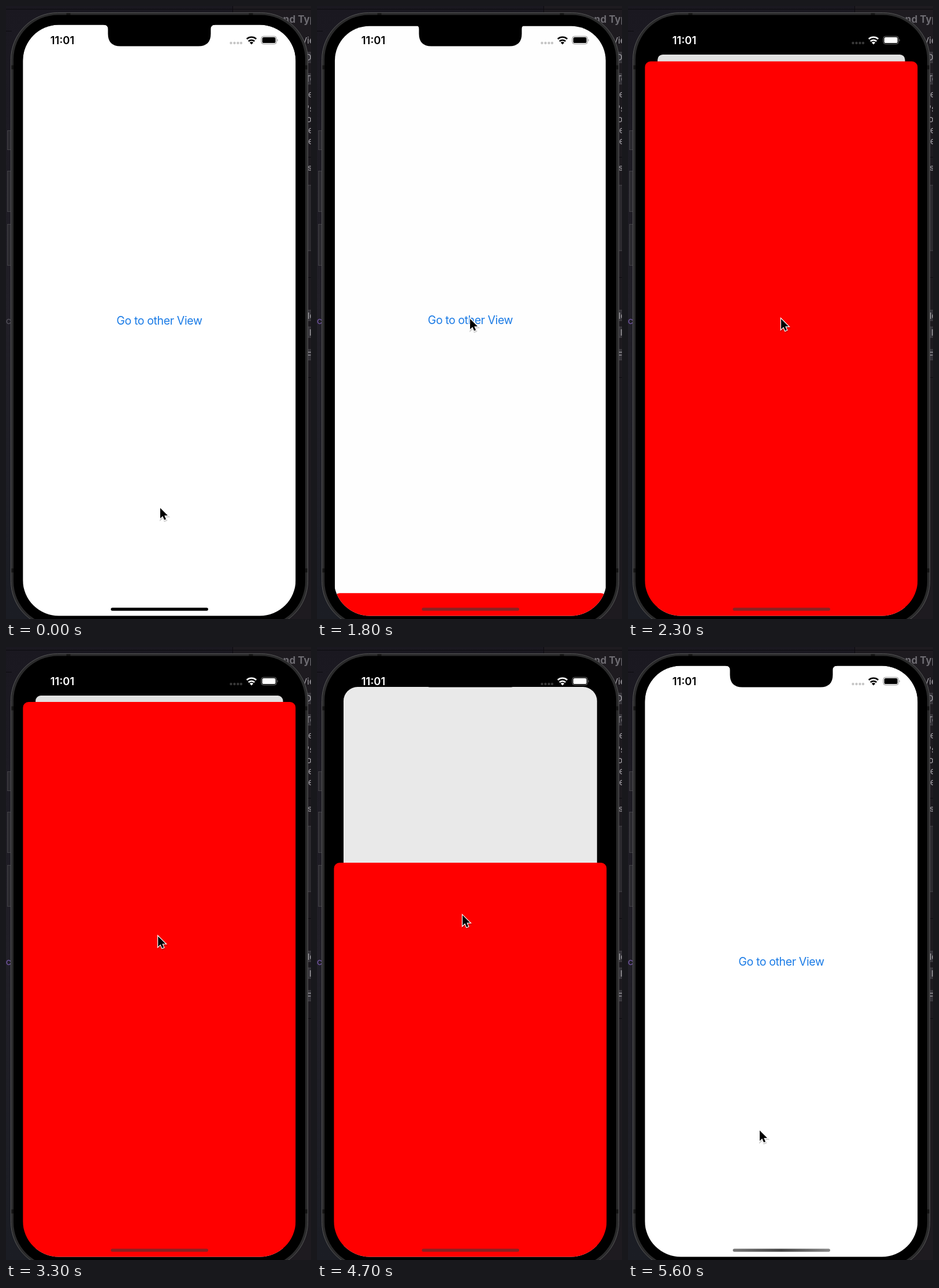
Recreate the animation shown at these times as an HTML page. Size 528 px wide and 1060 px high, loop 6600 ms.

```html
<!DOCTYPE html>
<html lang="en">
<head>
<meta charset="utf-8">
<title>Modal sheet demo</title>
<style>
html, body { margin: 0; height: 100%; overflow: hidden; background: #1c1b22; }
svg { display: block; width: 100vw; height: 100vh; }
text { font-family: Inter, Roboto, sans-serif; }
.side text { font-size: 15px; fill: #a5a3a8; }
.side rect { fill: #343238; stroke: #4a484d; }
</style>
</head>
<body>
<svg viewBox="0 0 528 1060">
  <defs>
    <clipPath id="screen"><rect x="29.2" y="32.5" width="472.3" height="1022" rx="62"/></clipPath>
    <linearGradient id="desk" x2="0" y2="1">
      <stop stop-color="#1a1820"/><stop offset=".5" stop-color="#211f27"/><stop offset="1" stop-color="#1b1d24"/>
    </linearGradient>
    <linearGradient id="barFade">
      <stop stop-color="#777"/><stop offset=".5" stop-color="#444"/><stop offset="1" stop-color="#888"/>
    </linearGradient>
  </defs>

  <!-- editor window behind the phone -->
  <rect width="528" height="1060" fill="url(#desk)"/>
  <rect x="392" width="136" height="1060" fill="#1e1b20"/>
  <path d="M0 5.5H528M0 43.5H10M392.5 0V12M520 261.5H528M520 469.5H528M520 642.5H528" stroke="#0c0b0f"/>
  <g fill="#2b2a2f" stroke="#424146">
    <rect x="2.5" y="215.5" width="20" height="33"/>
    <rect x="2.5" y="285.5" width="20" height="70"/>
    <rect x="2.5" y="377.5" width="20" height="71"/>
  </g>
  <text id="code" x="9" y="550" font-size="16" text-anchor="end">tc</text>
  <g class="side">
    <text x="470" y="29" style="font-size:17px;font-weight:700;fill:#6e6c72">and Type</text>
    <rect x="516" y="80" width="20" height="18"/>
    <rect x="516" y="117" width="20" height="18"/>
    <rect x="516" y="310" width="20" height="113" style="fill:#2c2a2f"/>
    <rect x="516" y="526" width="20" height="18"/>
    <rect x="516" y="555" width="20" height="18"/>
    <rect x="516" y="594" width="20" height="18"/>
    <text x="511" y="65">View</text>
    <text x="518" y="94">De</text>
    <text x="518" y="131">Te</text>
    <text x="523" y="158">e</text>
    <text x="521" y="183">'s</text>
    <text x="520" y="201">oo</text>
    <text x="523" y="220">e</text>
    <text x="523" y="239">e</text>
    <text x="522" y="285" style="font-weight:700;fill:#77757a">s</text>
    <text x="522" y="541">lo</text>
    <text x="525" y="570">l</text>
    <text x="520" y="609">Fi</text>
  </g>

  <!-- phone body -->
  <rect x="8.5" y="11.5" width="514" height="1064" rx="81" fill="#2a2a2b" stroke="#555556"/>
  <path d="M9 106H14M517 106H522M9 976H14M517 976H522M108 12V16M424 12V16" stroke="#151515" stroke-width="7"/>
  <rect x="13" y="15.5" width="505" height="1056" rx="77"/>

  <g clip-path="url(#screen)">
    <rect class="card" fill="#fff"/>
    <text id="link" font-size="19.6" letter-spacing="-.4" text-anchor="middle" y="7" fill="#1a7be6">Go to other View</text>
    <rect id="dim" class="card"/>
  </g>
  <path d="M169 30V32.5Q176.5 32.5 176.5 40V48Q176.5 69.5 198 69.5H333Q354.5 69.5 354.5 48V40Q354.5 32.5 362 32.5V30Z"/>

  <g id="status">
    <text x="76.8" y="66" font-size="18.5" font-weight="600">11:01</text>
    <g opacity=".22">
      <circle cx="389.5" cy="64" r="2.2"/><circle cx="395.5" cy="64" r="2.2"/>
      <circle cx="401.5" cy="64" r="2.2"/><circle cx="407" cy="64" r="2.2"/>
    </g>
    <path d="M416.8 56.9A12.3 12.3 0 0 1 433.2 56.9M419.8 61A7.8 7.8 0 0 1 430.2 61" fill="none" stroke="currentColor" stroke-width="2.7"/>
    <path d="M425 66.5L421.8 63.2A4.6 4.6 0 0 1 428.2 63.2Z"/>
    <rect x="441.9" y="52.4" width="26.4" height="13.4" rx="4" fill="none" stroke="currentColor" opacity=".45"/>
    <rect x="443.6" y="54.1" width="23" height="10" rx="2.6"/>
    <path d="M469.6 57Q471.6 59.1 469.6 61.5Z" opacity=".5"/>
  </g>

  <g clip-path="url(#screen)">
    <rect id="sheet" x="29.2" width="472.3" height="1100" rx="10" fill="#f00"/>
  </g>
  <rect id="bar" x="181.5" y="1040.5" width="168.5" height="5.2" rx="2.6"/>

  <g id="cursor">
    <path d="M1 1V19L5.2 15L8 21.6L11 20.4L8.2 14H14Z" transform="translate(.6 1.8)" fill="none" stroke="#000" stroke-opacity=".18" stroke-width="3"/>
    <path d="M1 1V19L5.2 15L8 21.6L11 20.4L8.2 14H14Z" stroke="#fff" stroke-width="2.4" paint-order="stroke"/>
  </g>
</svg>
<script>
const LOOP = 6600, STEP = 100;
const PRESENT = 1782.5, DRAG = 4400, RELEASE = 4900, DONE = 5600;
const CLOSED = 1055, OPEN = 95, TRAVEL = CLOSED - OPEN;
const $ = id => document.getElementById(id);
const cards = document.querySelectorAll('.card');

const ramp = (t, a, b) => Math.min(1, Math.max(0, (t - a) / (b - a)));
const easeOut = k => k * (2 - k);
const smooth = k => k * k * (3 - 2 * k);
const spring = w => 1 - (1 + w) * Math.exp(-w); // critically damped

const home = { x: 266, y: 867 };
const moves = [
  { from: 100, to: 1400, x: 264, y: 540, ease: easeOut },
  { from: 3200, to: 3700, x: 247, y: 147, ease: smooth },
  { from: 3900, to: 4200, x: 248, y: 125, ease: smooth },
  { from: DRAG, to: 5020, x: 227, y: 835, ease: smooth, bow: 13 }
];

function pointer(t) {
  let { x, y } = home;
  for (const m of moves) {
    const k = m.ease(ramp(t, m.from, m.to));
    x += (m.x - x) * k + (m.bow || 0) * Math.sin(Math.PI * k);
    y += (m.y - y) * k;
  }
  return { x, y };
}

// The sheet follows the pointer with some resistance
const dragged = t => OPEN + .823 * (pointer(t).y - 125);

function sheetTop(t) {
  if (t < PRESENT || t >= DONE) return CLOSED;
  if (t < DRAG) return CLOSED - TRAVEL * spring((t - PRESENT) * .01826);
  if (t < RELEASE) return dragged(t);
  const y = dragged(RELEASE);
  return y + (CLOSED - y) * spring((t - RELEASE) * .01175);
}

function set(el, attrs) {
  for (const k in attrs) el.setAttribute(k, attrs[k]);
}

function draw(t) {
  const sheetY = sheetTop(t), p = (CLOSED - sheetY) / TRAVEL;
  const inset = 22 * p ** .8, width = 472.3 - 2 * inset;
  for (const c of cards)
    set(c, { x: 29.2 + inset, y: 32.5 + 51.5 * p, width, height: 1100, rx: 62 - 53 * p });
  set($('dim'), { 'fill-opacity': .12 * p });
  set($('link'), {
    transform: `translate(265.4 ${544 - 14 * p}) scale(${width / 472.3})`,
    opacity: 1 - .65 * Math.sin(Math.PI * ramp(t, 1500, 1800))
  });
  set($('sheet'), { y: sheetY });

  const v = Math.round(255 * (ramp(t, 1800, 2100) - ramp(t, RELEASE, 5200)));
  const tone = `rgb(${v},${v},${v})`;
  set($('status'), { fill: tone, color: tone });
  set($('bar'), { fill: t < 1800 ? '#000' : t < 5500 ? '#8a2222' : 'url(#barFade)' });
  set($('code'), { fill: t < 400 ? '#55535c' : '#7558a8' });
  const { x, y } = pointer(t);
  set($('cursor'), { transform: `translate(${x} ${y})` });
}

const start = performance.now();
function frame() {
  const t = (performance.now() - start) % LOOP;
  draw(Math.floor(t / STEP) * STEP);
  requestAnimationFrame(frame);
}
frame();
</script>
</body>
</html>
```
